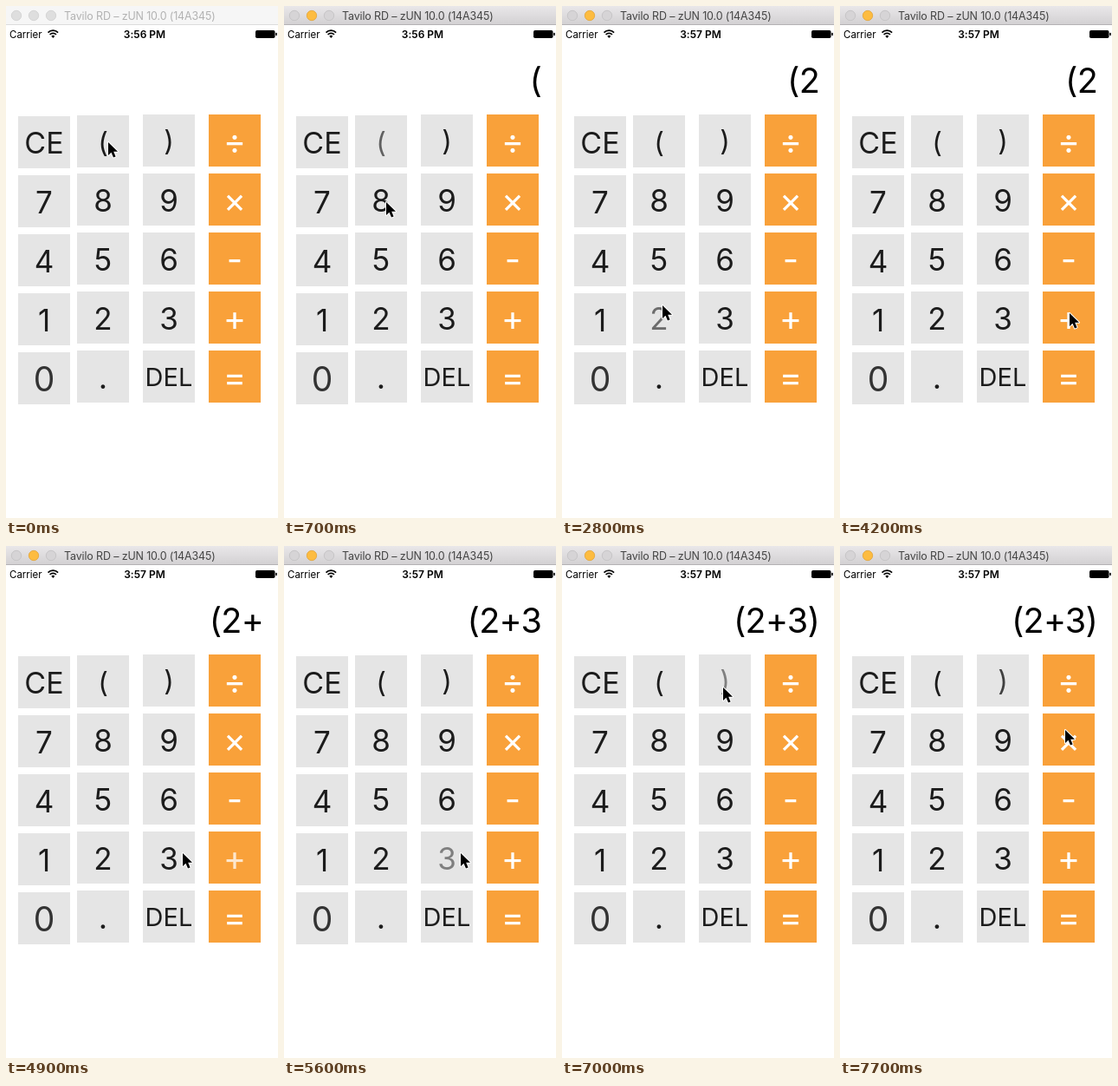
Write an HTML page that moves like this. It is 314 by 590 pixels and loops after 8000 ms.

```html
<!DOCTYPE html>
<html lang="en">
<head>
<meta charset="utf-8">
<title>Calculator</title>
<style>
  html, body { margin: 0; width: 100%; height: 100%; overflow: hidden; background: #fff; }
  svg { display: block; }
  text { font-family: Inter, "Open Sans", sans-serif; font-feature-settings: "calt" 0; white-space: pre; }
</style>
</head>
<body>
<svg id="stage" width="314" height="590" viewBox="0 0 314 590">
  <defs>
    <linearGradient id="chrome" x2="0" y2="1">
      <stop stop-color="#e9e7e9"/>
      <stop offset="1" stop-color="#d2d0d2"/>
    </linearGradient>
  </defs>

  <rect id="bar" width="314" height="22"/>
  <path id="rule" d="M0 21.5H314"/>
  <g id="dots" stroke-width=".8">
    <circle cx="12" cy="11" r="5.7"/>
    <circle cx="32" cy="11" r="5.7"/>
    <circle cx="52" cy="11" r="5.7"/>
  </g>
  <text id="title" x="67" y="15.5" font-size="12.5" letter-spacing="-.15">Tavilo RD – zUN 10.0 (14A345)</text>

  <text x="4" y="36.5" font-size="11.5">Carrier</text>
  <g fill="none" stroke="#000" stroke-width="1.7">
    <path d="M48.5 30.6a8.2 8.2 0 0 1 11.6 0M50.6 33a5.2 5.2 0 0 1 7.4 0"/>
    <path d="M54.3 37l-2-2.2a2.9 2.9 0 0 1 4 0z" fill="#000" stroke="none"/>
  </g>
  <text id="clock" x="160" y="36.5" font-size="12" font-weight="600" text-anchor="middle"></text>
  <rect x="288" y="28" width="22.5" height="9" rx="1.8"/>
  <rect x="311.2" y="30.7" width="1.6" height="3.6" rx=".8"/>

  <text id="display" x="297" y="100" font-size="39.5" letter-spacing="-.8" text-anchor="end"></text>
  <g id="keys"></g>
  <path id="cursor" d="M0 0V15L3.5 11.7L6 17.5L8.6 16.4L6.2 10.8H11Z"
        stroke="#fff" stroke-width="2" paint-order="stroke" stroke-linejoin="round"/>
</svg>
<script>
const $ = id => document.getElementById(id);
const pen = document.createElement('canvas').getContext('2d');

function add(parent, tag, attrs, text = '') {
  const el = document.createElementNS('http://www.w3.org/2000/svg', tag);
  for (const name in attrs) el.setAttribute(name, attrs[name]);
  el.textContent = text;
  return parent.appendChild(el);
}

// Baseline that puts the middle of the drawn glyph at height y.
function baseline(text, size, y) {
  pen.font = `${size}px Inter, "Open Sans", sans-serif`;
  const m = pen.measureText(text);
  return y + (m.actualBoundingBoxAscent - m.actualBoundingBoxDescent) / 2;
}

const columns = [
  { x: 14, y: 127, labels: ['CE', '7', '4', '1', '0'] },
  { x: 82, y: 125, labels: ['(', '8', '5', '2', '.'] },
  { x: 158, y: 125, labels: [')', '9', '6', '3', 'DEL'] },
  { x: 234, y: 125, labels: ['÷', '×', '-', '+', '='] }
];
const sizes = { CE: 34, DEL: 29, 0: 39, '(': 32, ')': 32, '.': 36 };
const middles = { '(': 32.5, ')': 32, '.': 41.5, CE: 30, DEL: 30 };
const keys = {};

for (const { x, y, labels } of columns) {
  const operator = x === 234;
  labels.forEach((label, row) => {
    const top = y + row * 68 + (label === '(' ? 1 : 0);
    const size = sizes[label] || (operator ? 40 : 35);
    const middle = middles[label] || (operator ? 33 : 30.5);
    add($('keys'), 'rect', { x, y: top, width: 60, height: 60, fill: operator ? '#f9a13a' : '#e5e5e5' });
    keys[label] = add($('keys'), 'text', {
      x: x + 30, y: baseline(label, size, top + middle), 'font-size': size, 'text-anchor': 'middle',
      fill: operator ? '#fff' : label === '0' ? '#333' : '#1c1c1c'
    }, label);
  });
}

// Each step: display, cursor x, cursor y, fading key, its opacity.
const STEP = 700, LOOP = 8000;
const steps = [
  ['', 118, 157],
  ['(', 118, 226, '(', .65],
  ['(', 116, 345],
  ['(', 116, 345, '2', .15],
  ['(2', 116, 345, '2', .6],
  ['(2', 265, 354],
  ['(2', 265, 354],
  ['(2+', 204, 354, '+', .75],
  ['(2+3', 204, 354, '3', .5],
  ['(2+3', 186, 163, '3', .85],
  ['(2+3)', 186, 163, ')', .5],
  ['(2+3)', 260, 212, ')', .82]
];

function show(index) {
  const [display, x, y, fading, opacity] = steps[index];
  const active = index > 0;
  $('display').textContent = display;
  $('clock').textContent = index < 3 ? '3:56 PM' : '3:57 PM';
  $('cursor').setAttribute('transform', `translate(${x} ${y})`);
  for (const label in keys) keys[label].setAttribute('opacity', label === fading ? opacity : 1);

  $('bar').setAttribute('fill', active ? 'url(#chrome)' : '#f6f6f6');
  $('rule').setAttribute('stroke', active ? '#b4b2b4' : '#dcdcdc');
  $('title').setAttribute('fill', active ? '#444' : '#b2b2b2');
  [...$('dots').children].forEach((dot, i) => {
    const lit = active && i === 1;
    dot.setAttribute('fill', lit ? '#fdbc40' : active ? '#d6d4d6' : '#dedede');
    dot.setAttribute('stroke', lit ? '#e2a436' : active ? '#c2c0c2' : '#d0d0d0');
  });
}

const start = performance.now();
let shown = -1;
function tick() {
  const index = Math.floor((performance.now() - start) % LOOP / STEP);
  if (index !== shown) show(shown = index);
  requestAnimationFrame(tick);
}
tick();
</script>
</body>
</html>
```
